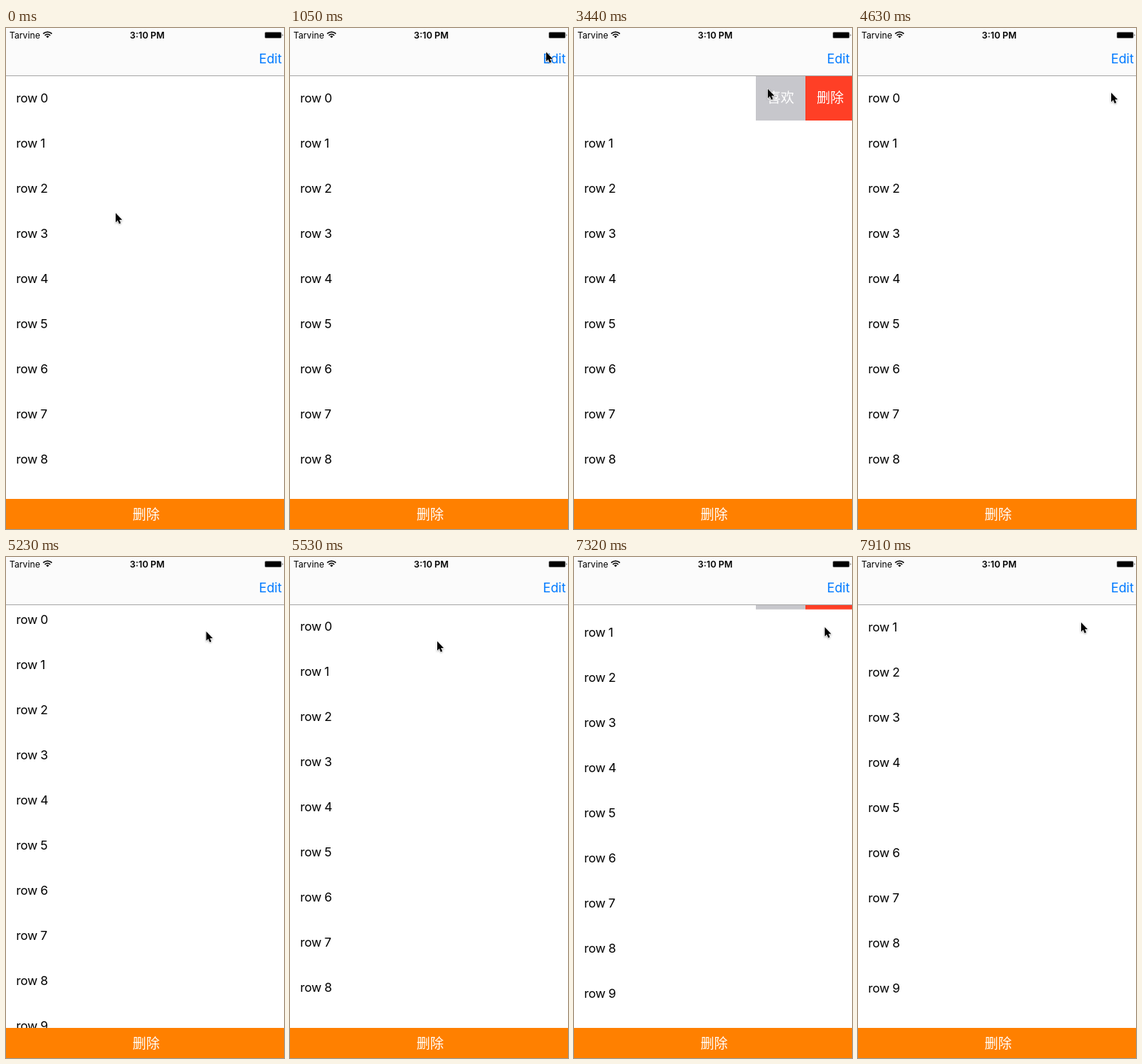
Animation of 370x666 px, one loop 8 s. Source, as an HTML page:

```html
<!DOCTYPE html>
<html lang="en">
<head>
<meta charset="utf-8">
<style>
html, body { margin: 0; width: 100%; height: 100%; overflow: hidden; background: #fff; }
svg { display: block; width: 370px; height: 666px; font-family: Inter, Roboto, sans-serif; }
.row { font-size: 16.5px; letter-spacing: -.35px; }
.cjk { font: 18px "Noto Sans CJK SC", "Noto Sans CJK", sans-serif; fill: #fff; text-anchor: middle; }
</style>
</head>
<body>
<svg viewBox="0 0 370 666">
  <g id="list"></g>

  <rect width="370" height="63" fill="#fbfbfb"/>
  <rect y="63" width="370" height="1" fill="#a9a9a9"/>
  <text x="4.5" y="13.5" font-size="11.7">Tarvine</text>
  <g fill="none" stroke="#000" stroke-width="1.5">
    <path d="M49.5 7.6a8.2 8.2 0 0 1 11.6 0M51.7 9.9a5 5 0 0 1 7.2 0"/>
    <path d="M55.3 13.3l-2-2.1a2.8 2.8 0 0 1 4 0z" fill="#000" stroke="none"/>
  </g>
  <text x="188" y="13.5" font-size="12" font-weight="600" text-anchor="middle">3:10 PM</text>
  <rect x="344.5" y="5.5" width="22" height="8" rx="1.5" fill="none" stroke="#999"/>
  <rect x="345" y="6" width="21" height="7" rx=".5"/>
  <path d="M367.7 7.8q1.6 1.7 0 3.4z"/>
  <text x="367" y="47" font-size="17" fill="#007aff" text-anchor="end">Edit</text>

  <rect y="626" width="370" height="40" fill="#ff8000"/>
  <text class="cjk" x="186.5" y="653">删除</text>

  <g id="cursor">
    <path d="M0 0V14.2L3.2 11.3 5.4 16.5 7.9 15.4 5.7 10.4H10Z" transform="scale(.86)" stroke="#fff"
      stroke-width="1.2" paint-order="stroke" style="filter:drop-shadow(0 1px 1px #0005)"/>
  </g>
</svg>
<script>
const LOOP = 8000, TICK = 149.2, ROW = 60, TOP = 63, BUTTON = 66, SCREEN = 374;

// Pointer glides: start tick, end tick, destination
const home = [146, 246];
const glides = [
  [1, 7, 341, 32], [8, 10, 341, 92], [10, 11, 236, 88], [13, 14, 147, 87], [14, 15, 312, 90],
  [20, 23, 258, 81], [24, 31, 337, 86], [33, 37, 196, 112], [39, 41, 300, 102],
  [42, 45, 274, 97], [45, 47, 338, 94], [48, 53, 297, 87]
];

const ramp = (k, from, to) => Math.min(1, Math.max(0, (k - from) / (to - from)));
const easeOut = f => f * (2 - f);
const smooth = f => f * f * (3 - 2 * f);

function pointer(k) {
  let [x, y] = home;
  for (const [from, to, toX, toY] of glides) {
    const f = smooth(ramp(k, from, to));
    x += (toX - x) * f;
    y += (toY - y) * f;
  }
  return [x, y];
}

const byId = id => document.getElementById(id);
const move = (el, x, y) => el.setAttribute('transform', `translate(${x} ${y})`);
const button = (id, color, label) =>
  `<g id="${id}"><rect width="${BUTTON}" height="${ROW}" fill="${color}"/>
   <text class="cjk" x="33" y="36">${label}</text></g>`;

const list = byId('list');
list.innerHTML = Array.from({ length: 10 }, (_, i) =>
  `<g><rect width="370" height="${ROW}" fill="#fff"/>
   <text class="row" x="13.6" y="36">row ${i}</text>
   ${i ? '' : button('like', '#c7c7cc', '喜欢') + button('remove', '#ff3f26', '删除')}</g>`).join('');
const rows = [...list.children];
const label = rows[0].querySelector('.row');

function draw(ms) {
  const k = Math.floor(ms / TICK);   // the screen refreshes once per tick
  const open = 2 * BUTTON * (ramp(k, 14, 15) - easeOut(ramp(k, 25, 27)) + ramp(k, 39, 40));
  const offset = Math.round(12 * Math.sin(Math.PI * ramp(k, 34, 37.1)));
  const gone = ROW * easeOut(ramp(k, 47, 50));
  rows.forEach((row, i) => move(row, 0, TOP + i * ROW - offset - (i ? gone : 0)));
  move(label, -open, 0);
  move(byId('like'), SCREEN - open, 0);
  move(byId('remove'), SCREEN - open / 2, 0);
  move(byId('cursor'), ...pointer(k));
}

let start;
function frame(now) {
  start ??= now;
  draw((now - start) % LOOP);
  requestAnimationFrame(frame);
}
draw(0);
requestAnimationFrame(frame);
</script>
</body>
</html>
```
